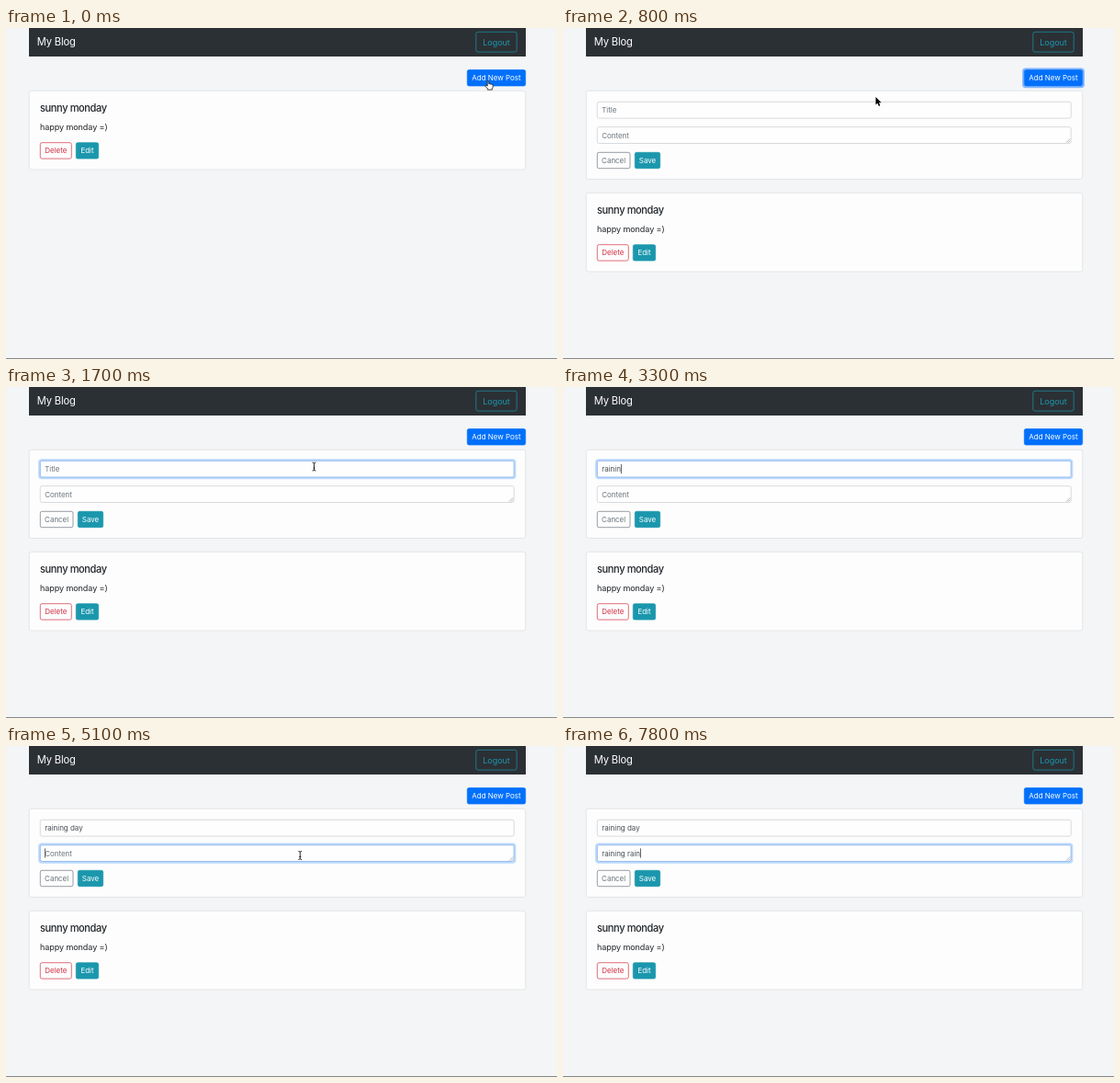
An HTML page that plays this animation: 600x360 px, repeating every 8 s.

```html
<!DOCTYPE html>
<html lang="en">
<head>
<meta charset="utf-8">
<title>My Blog</title>
<style>
  html, body { margin: 0; width: 100%; height: 100%; overflow: hidden; background: #f4f5f7; }
  svg { display: block; width: 100%; height: 100%; }
  text { font-family: Inter, Roboto, "Open Sans", sans-serif; white-space: pre; }
  .small { font-size: 8px; letter-spacing: -.03px; }
  .body { font-size: 9.05px; letter-spacing: -.09px; fill: #212529; }
  .heading { font-size: 11.1px; font-weight: 500; letter-spacing: -.42px; fill: #212529; }
  .brand { font-size: 11.2px; letter-spacing: -.18px; fill: #fff; }
  .mid { text-anchor: middle; }
</style>
</head>
<body>
<svg id="stage" viewBox="0 0 600 360"></svg>
<script>
const LOOP = 8000, STEP = 100;
const BLUE = '#0070fb', TEAL = '#1b97ad', RED = '#d33244', GREY = '#6c757d';
const FORM_AT = 200, TITLE_CLICK = 1200, CONTENT_CLICK = 4900, FADE = 150;

const stage = document.getElementById('stage');

function add(parent, tag, attrs, text) {
  const el = document.createElementNS('http://www.w3.org/2000/svg', tag);
  for (const key in attrs) el.setAttribute(key, attrs[key]);
  if (text) el.textContent = text;
  parent.append(el);
  return el;
}

const set = (el, key, value) => el.setAttribute(key, value);
const show = (el, on) => set(el, 'visibility', on ? 'visible' : 'hidden');
const clamp = v => Math.max(0, Math.min(1, v));

// Outlined box whose border lies inside the given bounds.
function box(parent, x, y, w, h, r, fill, stroke) {
  return add(parent, 'rect', {
    x: x + .3, y: y + .3, width: w - .6, height: h - .6, rx: r,
    fill, stroke, 'stroke-width': .7
  });
}

function label(parent, x, y, cls, text, fill) {
  return add(parent, 'text', fill ? { x, y, class: cls, fill } : { x, y, class: cls }, text);
}

function button(parent, x, y, w, text, color, solid) {
  box(parent, x, y, w, 18, 1.9, solid ? color : 'none', color);
  label(parent, x + w / 2, y + 11.9, 'small mid', text, solid ? '#fff' : color);
}

function card(parent, y, h) {
  box(parent, 25, y, 541, h, 2.3, '#fdfdfd', '#dcdddf');
}

function ring(parent, x, y, w, h, color) {
  return add(parent, 'rect', {
    x: x - .9, y: y - .9, width: w + 1.8, height: h + 1.8, rx: 2.8,
    fill: 'none', stroke: color, 'stroke-width': 1.9
  });
}

function field(y, hint) {
  const g = add(form, 'g');
  const glow = ring(g, 37, y, 516.5, 18.4, '#bcdaff');
  const frame = box(g, 37, y, 516.5, 18.4, 1.9, '#fefefe', '#c8ccd1');
  const focus = box(g, 37, y, 516.5, 18.4, 1.9, 'none', '#80b5fb');
  const placeholder = label(g, 42.2, y + 12.3, 'small', hint, GREY);
  const value = label(g, 42.2, y + 12.3, 'small', '', '#495057');
  const caret = add(g, 'rect', { y: y + 4, width: .7, height: 10.2, fill: '#222' });
  return { g, glow, frame, focus, placeholder, value, caret };
}

function drawField(f, text, focus, caretOn) {
  set(f.glow, 'opacity', focus);
  set(f.focus, 'opacity', focus);
  show(f.placeholder, !text);
  if (f.value.textContent !== text) f.value.textContent = text;
  const width = text ? f.value.getComputedTextLength() : 0;
  set(f.caret, 'x', 42.3 + width);
  set(f.caret, 'opacity', caretOn ? 1 : 0);
}

// Page
add(stage, 'rect', { width: 600, height: 360, fill: '#f4f5f7' });
add(stage, 'rect', { y: 359, width: 600, height: 1, fill: '#85878a' });
add(stage, 'rect', { x: 25, width: 541, height: 31, fill: '#2b3035' });
label(stage, 33.8, 19.2, 'brand', 'My Blog');
box(stage, 511.5, 4, 45, 22.4, 2.3, 'none', TEAL);
label(stage, 534, 18.5, 'body mid', 'Logout').style.fill = TEAL;

const addRing = ring(stage, 502, 45.3, 64, 18, '#80b4fb');
button(stage, 502, 45.3, 64, 'Add New Post', BLUE, true);

// New post form
const form = add(stage, 'g');
card(form, 68, 96.7);
const titleField = field(80, 'Title');
const contentField = field(107.4, 'Content');
add(contentField.g, 'path', {
  d: 'M548 124.6l4.2-4.2M550.3 124.6l1.9-1.9', stroke: '#85888c', 'stroke-width': .6
});
button(form, 37, 135, 36.3, 'Cancel', GREY, false);
button(form, 78, 135, 28, 'Save', TEAL, true);

// Existing post
const post = add(stage, 'g');
card(post, 68, 86.3);
label(post, 37, 91, 'heading', 'sunny monday');
label(post, 37, 111.4, 'body', 'happy monday =)');
button(post, 37, 124.4, 34.6, 'Delete', RED, false);
button(post, 76, 124.4, 25, 'Edit', TEAL, true);

// Pointers, each drawn around its hot spot
const pointer = add(stage, 'g');
const shapes = {
  hand: add(pointer, 'path', {
    d: 'M-.8 .3Q0-.6 .8 .3V3.4Q1.7 2.7 2.4 3.6Q3.3 3 3.9 3.9Q5 3.5 5.2 4.6V6.6L4.4 8.2V9.6H-.5V8.6L-3.2 5.6Q-3.3 4.4-2 4.6L-.8 5.7Z',
    fill: '#fff', stroke: '#111', 'stroke-width': .8, 'stroke-linejoin': 'round'
  }),
  arrow: add(pointer, 'path', {
    d: 'M0 0V8.6L2 6.8L3.4 9.9L4.9 9.2L3.5 6.3H6.2Z',
    fill: '#000', stroke: '#fff', 'stroke-width': .7, 'stroke-linejoin': 'round',
    'paint-order': 'stroke'
  }),
  beam: add(pointer, 'path', {
    d: 'M-1.8-4.4Q0-4.4 0-3.3Q0-4.4 1.8-4.4M0-3.3V3.5M-1.8 4.6Q0 4.6 0 3.5Q0 4.6 1.8 4.6M-1 1.6H1',
    fill: 'none', stroke: '#111', 'stroke-width': .9
  })
};

// Time, x, y
const path = [
  [500, 525, 57.5], [600, 484, 58], [700, 402, 66], [800, 340.5, 75],
  [1000, 336.5, 84], [1200, 335.5, 86.5],
  [4500, 335.5, 86.5], [4800, 321, 117], [5200, 320, 119.5]
];

function pointAt(t) {
  const i = path.findIndex(p => p[0] > t);
  if (i === 0) return path[0].slice(1);
  if (i < 0) return path[path.length - 1].slice(1);
  const [t0, x0, y0] = path[i - 1], [t1, x1, y1] = path[i];
  const k = (t - t0) / (t1 - t0);
  return [x0 + (x1 - x0) * k, y0 + (y1 - y0) * k];
}

function shapeAt(x, y) {
  if (x > 502 && y < 64) return 'hand';
  const inField = (y >= 80 && y <= 98.4) || (y >= 107.4 && y <= 125.8);
  return inField ? 'beam' : 'arrow';
}

// When each key is pressed
const titleKeys = [2000, 2400, 2600, 2800, 3000, 3200, 3500, 3600, 3800, 3900, 4100];
const contentKeys = [5500, 5600, 5800, 5900, 6000, 6200, 6300, 6700, 7000, 7200, 7300, 7800];
const typed = (text, keys, t) => text.slice(0, keys.filter(k => k <= t).length);
const fade = (t, from) => clamp((t - from) / FADE);

function render(t) {
  const formOpen = t >= FORM_AT;
  show(form, formOpen);
  // Hidden children must follow their group, so the form is also removed from view.
  set(form, 'display', formOpen ? 'inline' : 'none');
  set(post, 'transform', `translate(0 ${formOpen ? 111 : 0})`);
  set(addRing, 'opacity', fade(t, 50) - fade(t, TITLE_CLICK));

  if (formOpen) {
    const toContent = fade(t, CONTENT_CLICK);
    const titleCaret = t >= TITLE_CLICK && t < CONTENT_CLICK && !(t >= 1700 && t < 2000);
    drawField(titleField, typed('raining day', titleKeys, t),
      fade(t, TITLE_CLICK) - toContent, titleCaret);
    drawField(contentField, typed('raining rain', contentKeys, t),
      toContent, t >= CONTENT_CLICK);
  }

  const [x, y] = pointAt(t);
  const kind = shapeAt(x, y);
  const visible = t < 2000 || (t >= 4500 && t < 5600);
  set(pointer, 'transform', `translate(${x} ${y})`);
  for (const name in shapes) show(shapes[name], visible && name === kind);
}

function tick(now) {
  render(Math.floor((now % LOOP) / STEP) * STEP);
  requestAnimationFrame(tick);
}
render(0);
requestAnimationFrame(tick);
</script>
</body>
</html>
```
